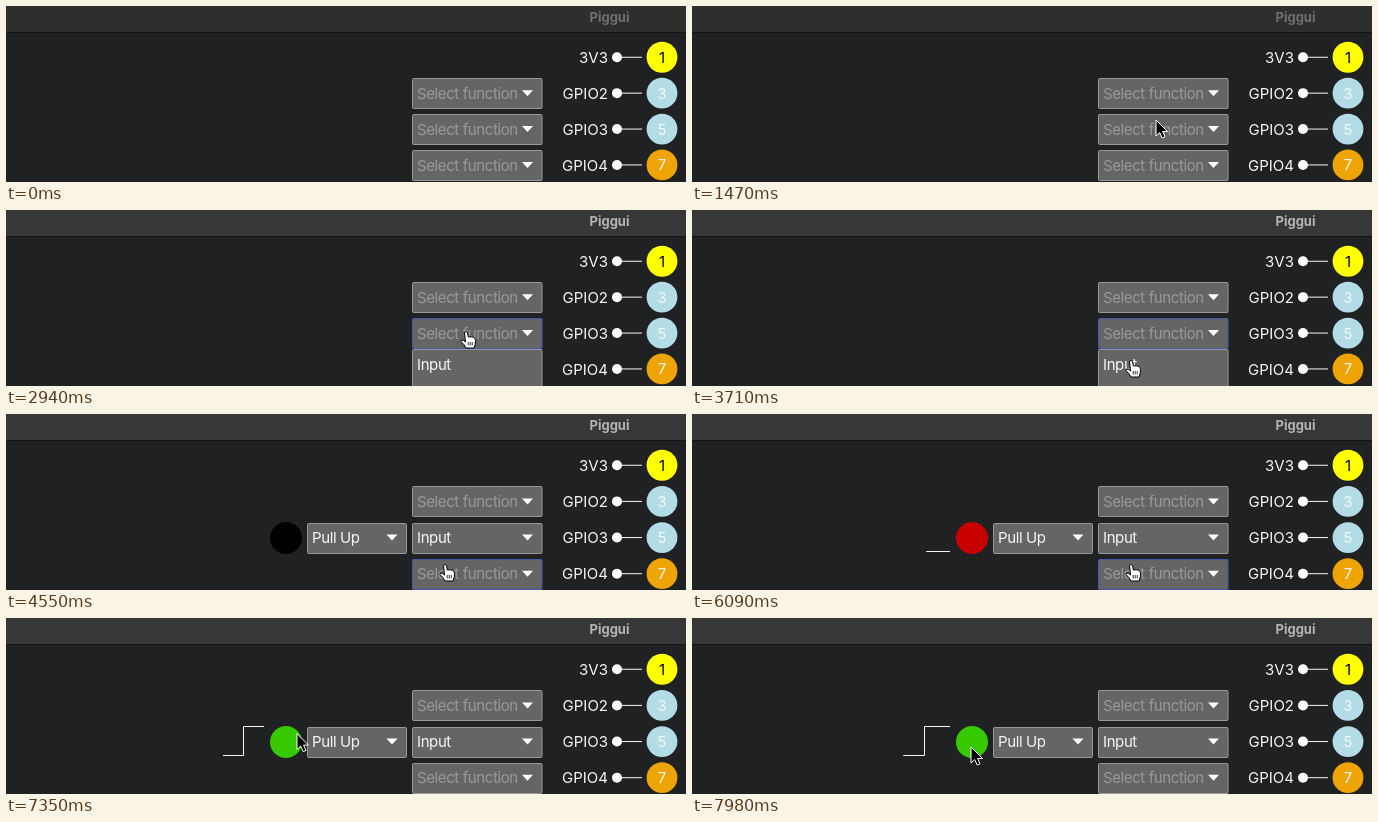
An HTML page that plays this animation: 680 by 176 pixels, repeating every 8000 ms.

```html
<!DOCTYPE html>
<html lang="en">
<head>
<meta charset="utf-8">
<title>GPIO pins</title>
<style>
html, body { margin: 0; width: 100%; height: 100%; overflow: hidden; background: #202123; }
svg { display: block; width: 680px; height: 176px; font: 15px Inter, "Noto Sans", sans-serif; }
.tight { letter-spacing: -.4px; }
.title { font-size: 13px; font-weight: 700; }
.mid { text-anchor: middle; }
.end { text-anchor: end; }
</style>
</head>
<body>
<svg id="stage" viewBox="0 0 680 176"></svg>
<script>
const LOOP = 8000, STEP = 70;
const WHITE = '#f6f6f6', EDGE = '#999', BLUE = '#4657ab';
const HINT = 'Select function';
const FOCUS = 1680, HOVER = 1960, OPEN = 2940, CHOSEN = 4200, ACTIVE = 4550, LIVE = 4970, LEAVE = 7140;
const stage = document.getElementById('stage');

const PINS = [
  { label: '3V3', color: '#ffff00', ink: '#000' },
  { label: 'GPIO2', color: '#b3dce6' },
  { label: 'GPIO3', color: '#b3dce6' },
  { label: 'GPIO4', color: '#eea404' }
];

// Pointer moves, each easing out to its end point
const ENTRY = { x: 575, y: 184 };
const MOVES = [
  { from: 770, to: 1470, x: 464, y: 114 },
  { from: 1470, to: 1540, x: 460, y: 121 },
  { from: 3220, to: 3710, x: 439, y: 150 },
  { from: 6440, to: 6930, x: 304, y: 101 },
  { from: 7070, to: 7980, x: 279, y: 129 }
];

const within = (t, from, to) => t >= from && t < to;
const text = (s, x, y, color = WHITE, kind = '') =>
  `<text x="${x}" y="${y}" fill="${color}" class="${kind}">${s}</text>`;
const disc = (x, y, r, color) => `<circle cx="${x}" cy="${y}" r="${r}" fill="${color}"/>`;
const line = d => `<path d="${d}" fill="none" stroke="${WHITE}"/>`;
const box = (x, y, w, h, edge) =>
  `<rect x="${x}" y="${y}" width="${w}" height="${h}" rx="1" fill="#656565" stroke="${edge}"/>`;

function picker(x, y, w, label, color, edge = EDGE) {
  return box(x, Math.round(y) - 14.5, w, 30, edge) + text(label, x + 4.5, y + 5.7, color, 'tight') +
    `<path d="M${x + w - 20} ${y - 3}h11l-5.5 6z" fill="#fff"/>`;
}

function pin({ label, color, ink = WHITE }, i, y) {
  return text(label, 602, y + 5.7, WHITE, 'end') +
    line(`M611 ${y}H636`) + disc(611, y, 5, '#fff') +
    disc(656, y, 15.4, color) + text(2 * i + 1, 656, y + 5.5, ink, 'mid');
}

function pointer(t) {
  return MOVES.reduce((at, { from, to, x, y }) => {
    const p = Math.min(1, Math.max(0, (t - from) / (to - from)));
    const ease = 1 - (1 - p) ** 2;
    return { x: at.x + (x - at.x) * ease, y: at.y + (y - at.y) * ease };
  }, ENTRY);
}

function cursor(t) {
  const { x, y } = pointer(t);
  const shape = within(t, FOCUS, LEAVE)
    ? '<path d="M-1.5 1.5Q0-.5 1.5 1.5L2.3 6Q9.5 5 9.5 9.5Q9.8 13 8 17H0Q-2 13-5 10.5Q-5.5 8-2.5 9.5L-.5 11Z" fill="#fff" stroke="#000"/>' +
      '<path d="M2.2 11v3.5m2-3.5v3.5m2-3.5v3.5" stroke="#000" stroke-width=".8"/>'
    : '<path d="M0 0V16L3.7 12.5L6.2 18L9 16.8L6.6 11.5H11.5Z" stroke="#fff"/>';
  const pressed = within(t, HOVER, 2380) || within(t, 3850, 3920);
  const ring = pressed ? '<circle r="31" fill="none" stroke="#000" stroke-width="2" opacity=".4"/>' : '';
  return `<g transform="translate(${x} ${y})">${ring}${shape}</g>`;
}

// The level trace scrolls left one sample at a time and rises after four
function trace(t) {
  const n = Math.floor((t - LIVE + STEP / 2) / 385);
  if (n < 0) return disc(280, 124, 16, '#000');
  const high = n > 3, tail = 251.5 - 5.75 * n;
  const rise = high ? `${Math.floor(tail + 20.8) + .5}V108.5H` : '';
  return disc(280, 124, 16, high ? '#36c900' : '#c80000') + line(`M${tail} 137.5H${rise}258`);
}

function draw(t) {
  const active = t >= ACTIVE, focused = t >= FOCUS;
  const row = i => 51.25 + (active ? 36.15 : 35.9) * i;
  const select = (i, label, color, edge) => picker(406.5, row(i), 129.5, label, color, edge);

  let s = '<rect width="680" height="176" fill="#202123"/>' +
    `<rect width="680" height="26" fill="${focused ? '#373737' : '#2e2e2d'}"/>` +
    '<path d="M0 26.5H680" stroke="#121212"/>' +
    text('Piggui', 603.5, 16, focused ? '#b4b4b3' : '#706f6d', 'title mid');
  PINS.forEach((p, i) => s += pin(p, i, row(i)));

  s += select(1, HINT, EDGE);
  s += active
    ? select(2, 'Input', WHITE) + picker(301.5, row(2), 99, 'Pull Up', WHITE) + trace(t)
    : select(2, HINT, EDGE, within(t, HOVER, CHOSEN) ? BLUE : EDGE);
  s += within(t, OPEN, ACTIVE)
    ? box(406.5, 139.5, 129.5, 60, EDGE) + text('Input', 411, 159.5, WHITE, 'tight')
    : select(3, HINT, EDGE, within(t, ACTIVE, LEAVE) ? BLUE : EDGE);

  stage.innerHTML = s + cursor(t);
}

let shown = -1;
function frame() {
  const t = Math.floor(performance.now() % LOOP / STEP) * STEP;
  if (t !== shown) draw(shown = t);
  requestAnimationFrame(frame);
}
frame();
</script>
</body>
</html>
```
